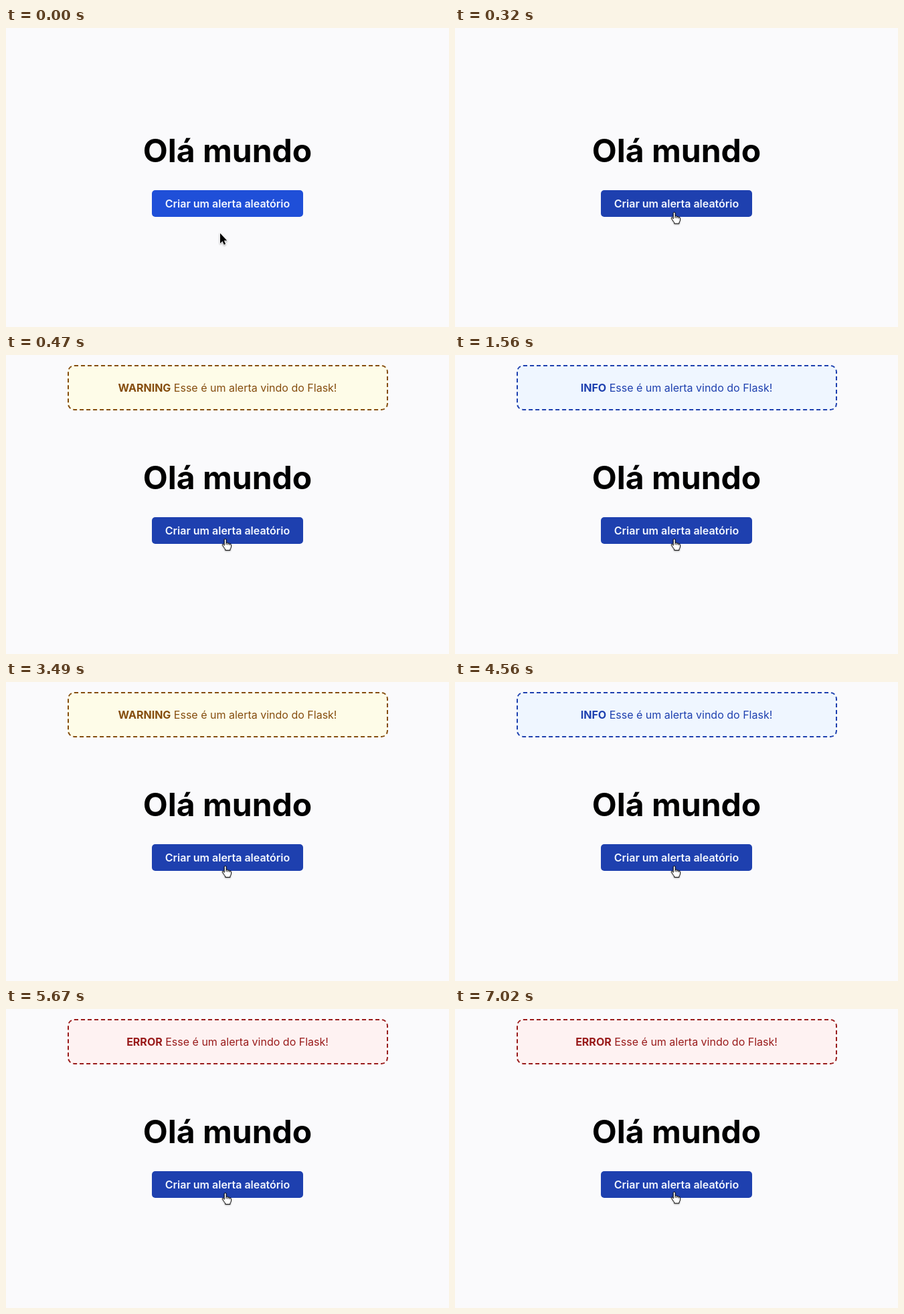
These frames come from a looping animation (662x448 px, 7.04 s). An HTML page:

```html
<!DOCTYPE html>
<html lang="pt">
<head>
<meta charset="utf-8">
<title>Olá mundo</title>
<style>
  html, body { margin: 0; width: 100%; height: 100%; overflow: hidden; background: #fafafc; }
  body { position: relative; font: 16px/24px Inter, sans-serif; font-optical-sizing: none; }
  .stage { position: absolute; left: 0; top: 0; width: 662px; height: 448px; overflow: hidden; text-align: center; }
  .stage > * { position: absolute; box-sizing: border-box; margin: 0; white-space: nowrap; }
  .box { left: 92px; top: 15px; width: 479px; height: 68px; border: 2px dashed; border-radius: 10px; }
  .message { left: 0; top: 37px; width: 662px; }
  h1 { left: 0; top: 160px; width: 662px; font-size: 48px; line-height: 48px; font-weight: 700; color: #000; }
  .button { left: 218px; top: 243px; width: 226px; height: 40px; border-radius: 5px;
    line-height: 40px; font-weight: 600; color: #f3f7ff; }
  svg { left: 0; top: 0; width: 662px; height: 448px; filter: drop-shadow(0 1px 1px #0005); }
</style>
</head>
<body>
<div class="stage">
  <div class="box" id="box"></div>
  <div class="message" id="message"><b id="level"></b> Esse é um alerta vindo do Flask!</div>
  <h1>Olá mundo</h1>
  <div class="button" id="button">Criar um alerta aleatório</div>
  <svg viewBox="0 0 662 448">
    <path id="arrow" stroke="#fff" stroke-width="1.6" stroke-linejoin="round" paint-order="stroke"
      d="M0 0V15.2L3.5 12L5.8 17.3L8.1 16.3L5.9 11.1H10.3Z"/>
    <path id="hand" fill="#fff" stroke="#000" stroke-linejoin="round"
      d="M3.7 10.3V2.1A1.45 1.45 0 0 1 6.6 2.1V6.6Q7.9 5.5 9.2 7.1Q10.6 6.3 11.7 7.9Q13.9 7.5 14 9.7V12.3
         Q13.8 14.2 12.5 15.7V17.6H5.2V16Q3.8 14.7 2.7 12.4L.8 9.8Q.5 8.1 2.1 8.4Z
         M6.6 6.6V9.4M9.2 7.1V9.6M11.7 7.9V10"/>
  </svg>
</div>
<script>
  const LOOP = 7040;
  const levels = {
    WARNING: ['#854d0e', '#fefce8'],
    INFO: ['#1e40af', '#eff6ff'],
    ERROR: ['#991b1b', '#fef2f2'],
  };
  const alerts = [[0, null], [470, 'WARNING'], [1560, 'INFO'], [3490, 'WARNING'], [4560, 'INFO'], [5670, 'ERROR']];
  const pointer = [
    [0, 'arrow', 320, 307.5],
    [100, 'arrow', 322, 297],
    [210, 'hand', 322.5, 277.5],
    [320, 'hand', 322.5, 275.5],
    [470, 'hand', 322.5, 275],
    [7020, 'hand', 322.5, 273.5],
  ];

  const el = id => document.getElementById(id);
  const [box, message, level, button] = ['box', 'message', 'level', 'button'].map(el);
  const cursors = ['arrow', 'hand'].map(el);
  const stepAt = (steps, t) => steps.filter(step => step[0] <= t).pop();

  function render(t) {
    const name = stepAt(alerts, t)[1];
    box.hidden = message.hidden = !name;
    if (name) {
      const [ink, fill] = levels[name];
      level.textContent = name;
      box.style.borderColor = message.style.color = ink;
      box.style.backgroundColor = fill;
    }

    const [, kind, x, y] = stepAt(pointer, t);
    button.style.backgroundColor = kind === 'hand' ? '#1e40af' : '#1f4fd8';
    for (const cursor of cursors) {
      cursor.style.display = cursor.id === kind ? '' : 'none';
      cursor.setAttribute('transform', `translate(${x} ${y})`);
    }
  }

  const start = performance.now();
  function tick() {
    render((performance.now() - start) % LOOP);
    requestAnimationFrame(tick);
  }
  tick();
</script>
</body>
</html>
```
